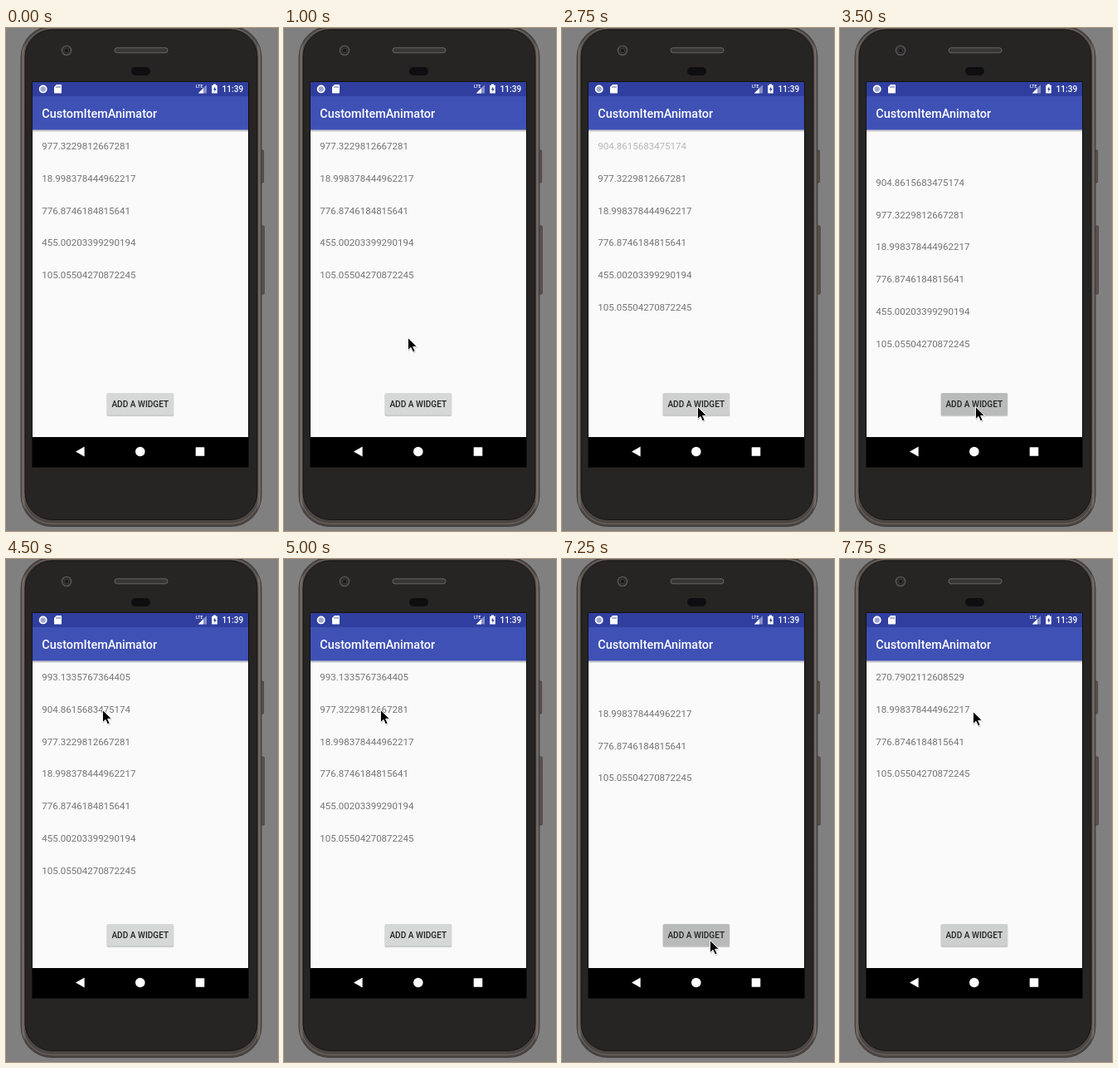
These frames come from a looping animation (328x605 px, 8 s). An HTML page:

```html
<!DOCTYPE html>
<html lang="en">
<head>
<meta charset="utf-8">
<title>CustomItemAnimator</title>
<style>
html, body { margin: 0; width: 100%; height: 100%; overflow: hidden; background: #808080; }
svg { display: block; width: 328px; height: 605px; }
text { font-family: Roboto, "Noto Sans", sans-serif; white-space: pre; }
.row { font-size: 11.56px; fill: #747474; }
.medium { font-weight: 500; }
</style>
</head>
<body>
<svg viewBox="0 0 328 605">
  <defs>
    <linearGradient id="drop" x1="0" y1="0" x2="0" y2="1">
      <stop offset="0" stop-opacity=".3"/>
      <stop offset="1" stop-opacity="0"/>
    </linearGradient>
    <linearGradient id="rim" x1="0" y1="0" x2="1" y2="0">
      <stop offset="0" stop-color="#4a4542"/>
      <stop offset=".008" stop-color="#7a706b"/>
      <stop offset=".02" stop-color="#4b4643"/>
      <stop offset=".98" stop-color="#4b4643"/>
      <stop offset=".992" stop-color="#7a706b"/>
      <stop offset="1" stop-color="#4a4542"/>
    </linearGradient>
  </defs>

  <!-- phone -->
  <rect width="328" height="605" fill="#808080"/>
  <g fill="#5c5450" stroke="#3b3735" stroke-width=".7">
    <rect x="307" y="147" width="3.6" height="39" rx="1"/>
    <rect x="307" y="238" width="4.4" height="82" rx="1"/>
  </g>
  <rect x="18" y="-2" width="290" height="601.5" rx="37" fill="url(#rim)" stroke="#383432" stroke-width=".8"/>
  <rect x="20.3" y=".3" width="285.4" height="596" rx="35" fill="none" stroke="#756b66"/>
  <rect x="23" y="2" width="280" height="589.5" rx="33" fill="#262524" stroke="#171615"/>
  <circle cx="73" cy="27" r="5.6" fill="#2c2a2a" stroke="#5b5857" stroke-width="1.4"/>
  <circle cx="73" cy="27" r="2.6" fill="#171717" stroke="#454343" stroke-width=".8"/>
  <rect x="131" y="23.8" width="64" height="6" rx="3" fill="#383635" stroke="#696663"/>
  <rect x="151" y="47" width="23" height="10" rx="5" fill="#0e0e11"/>

  <!-- screen -->
  <rect x="31.5" y="64.5" width="261" height="464" fill="#000"/>
  <rect x="32" y="65" width="260" height="427" fill="#fafafa"/>
  <rect x="32" y="122.5" width="260" height="3" fill="url(#drop)"/>
  <rect x="32" y="82" width="260" height="40.5" fill="#3f51b5"/>
  <rect x="32" y="65" width="260" height="17" fill="#303f9f"/>
  <g fill="#fff">
    <circle cx="44.7" cy="73.4" r="4.1" fill="#9fa7d3" stroke="#fff" stroke-width="1.7"/>
    <path d="M61 68h5.3q.7 0 .7.7v9.1q0 .7-.7.7h-7.6q-.7 0-.7-.7V71z"/>
    <path d="M61 70v2M63 70v2M65 70v2" stroke="#303f9f" stroke-width=".8"/>
    <text class="medium" x="229" y="72.4" font-size="5.2">LTE</text>
    <path d="M242 68.3v10.2h-10.2z" fill="#8992c8"/>
    <path d="M238 72.3v6.2h-6.2z"/>
    <path d="M250 68.8v-1.2h3v1.2h1.8v9.7h-6.6v-9.7z"/>
    <path d="M252.2 70.3l-2.2 3.9h1.4v2.8l2.2-4h-1.4z" fill="#303f9f"/>
    <text class="medium" x="260.5" y="77.2" font-size="10.1">11:39</text>
    <text class="medium" x="43.3" y="108.2" font-size="14.44">CustomItemAnimator</text>
    <path d="M84 509.5l10.6-6v12z"/>
    <circle cx="161.8" cy="509.5" r="5.8"/>
    <rect x="228.7" y="504.2" width="10.6" height="10.6" rx=".6"/>
  </g>

  <g id="rows"></g>

  <rect x="121.3" y="439.3" width="81.2" height="28" rx="2" fill="#000" opacity=".13"/>
  <rect x="121.8" y="439.5" width="80.2" height="27" rx="1.5" fill="#000" opacity=".12"/>
  <rect id="button" x="122" y="439" width="80" height="26.4" rx="1.5"/>
  <text class="medium" x="161.8" y="455.7" font-size="10.1" fill="#212121" text-anchor="middle">ADD A WIDGET</text>

  <g id="cursor">
    <path d="M1 1.6v15.4l3.5-3.3 2.6 5.6 2.9-1.3-2.5-5.5h4.9z" fill="#000" opacity=".18"/>
    <path d="M.5.6v15l3.5-3.3 2.5 5.5 2.6-1.2-2.5-5.3h4.8z" fill="#000" stroke="#fff" stroke-width=".9"/>
  </g>
</svg>
<script>
const LOOP = 8000;
const ROW = 38.75;
const OVERSHOOT = 5;
const BUTTON = ['#d6d7d7', '#cecfcf', '#b9baba'];

const values = {
  a: '977.3229812667281',
  b: '18.998378444962217',
  c: '776.8746184815641',
  d: '455.00203399290194',
  e: '105.05504270872245',
  f: '904.8615683475174',
  g: '993.1335767364405',
  h: '270.7902112608529'
};

// Each step changes only what it names: at (cursor), press (button shade),
// list (row order), fade (row and its opacity), push (overshoot of older rows).
const steps = [
  { t: 0, at: null, press: 0, list: 'abcde' },
  { t: 500, at: [131, 220] },
  { t: 750, at: [137, 285] },
  { t: 1000, at: [149, 372] },
  { t: 1250, at: [160, 438] },
  { t: 1500, at: [163, 455] },
  { t: 2000, press: 1 },
  { t: 2500, press: 2, list: 'fabcde', fade: ['f', 0], push: 1 },
  { t: 2750, press: 1, fade: ['f', .5] },
  { t: 3000, press: 0 },
  { t: 3500, press: 2, list: 'gfabcde', fade: ['g', 0], push: 1 },
  { t: 3750, press: 1, fade: ['g', .5] },
  { t: 4000, press: 0, at: [158, 425] },
  { t: 4250, at: [130, 270] },
  { t: 4500, at: [116, 181] },
  { t: 4750, fade: ['f', .4] },
  { t: 5000, list: 'gabcde' },
  { t: 5250, fade: ['a', .4] },
  { t: 5500, list: 'gbcde' },
  { t: 5750, at: [117, 143] },
  { t: 6000, fade: ['g', .4], at: [118, 180] },
  { t: 6250, list: 'bcde', at: [120, 249] },
  { t: 6500, fade: ['d', .4], at: [121, 222] },
  { t: 6750, list: 'bce', at: [209, 467] },
  { t: 7000, at: [178, 458], press: 1 },
  { t: 7250, press: 2, list: 'hbce', fade: ['h', 0], push: 1 },
  { t: 7500, fade: ['h', .5], at: [172, 340] },
  { t: 7750, press: 1, at: [160, 183] }
];

const byId = id => document.getElementById(id);
const button = byId('button');
const cursor = byId('cursor');
const rows = {};

for (const key in values) {
  const row = document.createElementNS('http://www.w3.org/2000/svg', 'text');
  row.setAttribute('class', 'row');
  row.setAttribute('x', 43.2);
  row.textContent = values[key];
  byId('rows').append(row);
  rows[key] = row;
}

function stateAt(t) {
  let state = {};
  for (const step of steps) {
    if (step.t > t) break;
    state = { ...state, fade: null, push: 0, ...step };
  }
  return state;
}

function draw({ at, press, list, fade, push }) {
  for (const key in rows) {
    const i = list.indexOf(key);
    const alpha = i < 0 ? 0 : fade && fade[0] === key ? fade[1] : 1;
    rows[key].setAttribute('opacity', alpha);
    rows[key].setAttribute('y', 146.2 + i * ROW + (push && i > 0 ? OVERSHOOT : 0));
  }
  button.setAttribute('fill', BUTTON[press]);
  cursor.setAttribute('visibility', at ? 'visible' : 'hidden');
  if (at) cursor.setAttribute('transform', `translate(${at})`);
}

const start = performance.now();
function tick() {
  draw(stateAt((performance.now() - start) % LOOP));
  requestAnimationFrame(tick);
}
tick();
</script>
</body>
</html>
```
